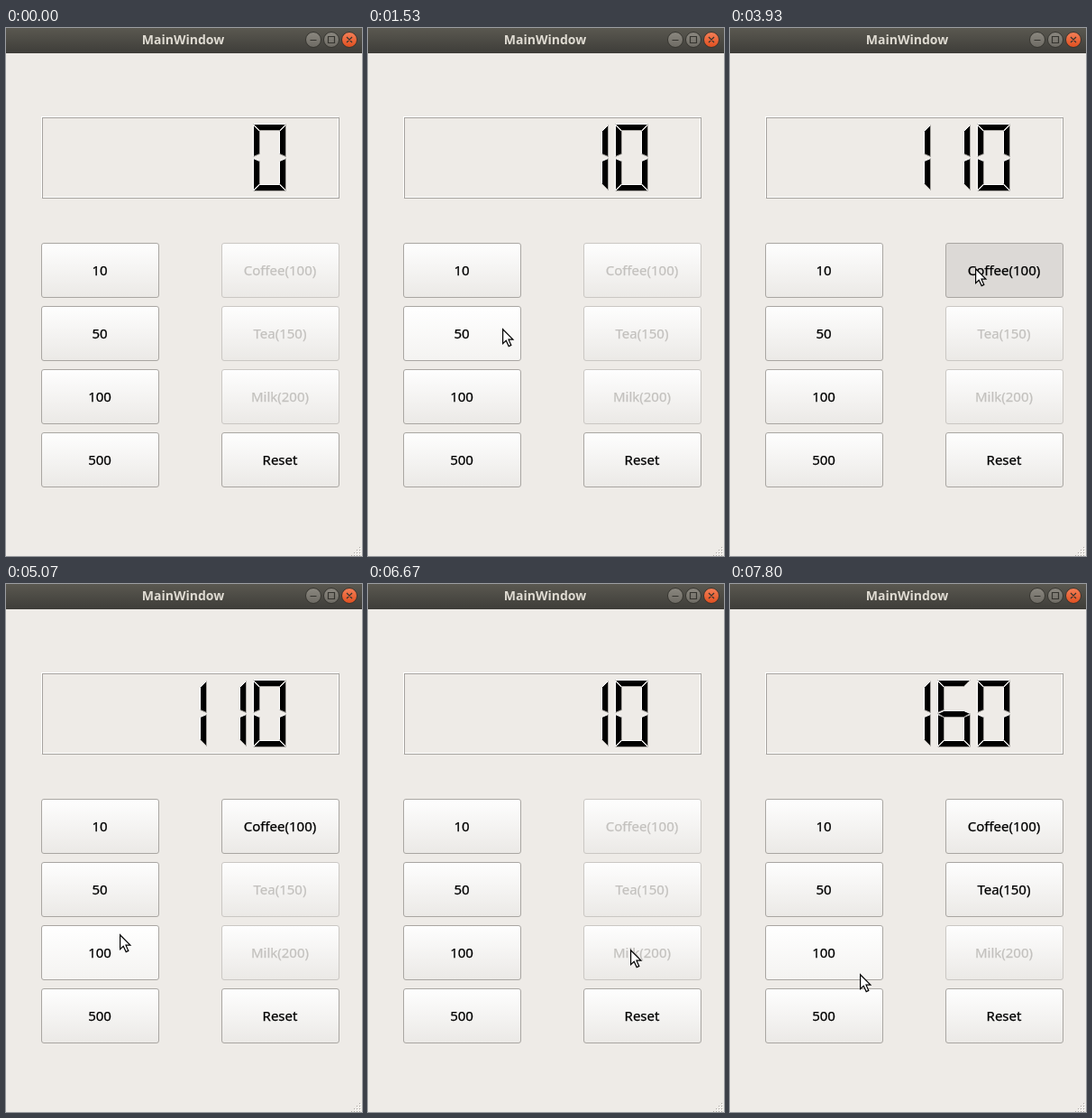
Recreate the animation shown at these times as an HTML page. Size 395 by 585 pixels, loop 8 s.

```html
<!DOCTYPE html>
<html lang="en">
<head>
<meta charset="utf-8">
<title>MainWindow</title>
<style>
  html, body { margin: 0; width: 100%; height: 100%; overflow: hidden; background: #eeebe7; }
  svg { display: block; width: 100%; height: 100%; }
  text { font: 15px "Noto Sans", "Open Sans", sans-serif; text-anchor: middle; }
  .title { font-size: 14px; font-weight: bold; fill: #dfdbd2; }
  .button rect { fill: url(#face); stroke: #a9a6a2; }
  .button text { fill: #000; stroke: #000; stroke-width: .25; }
  .button.hover rect { fill: url(#hoverFace); }
  .button.pressed rect { fill: #dcd9d6; }
  .button.disabled rect { stroke: #cac7c3; }
  .button.disabled text { fill: #c3c1be; stroke: #c3c1be; }
</style>
</head>
<body>
<svg viewBox="0 0 395 585">
  <defs>
    <linearGradient id="bar" x2="0" y2="1"><stop stop-color="#5a5850"/><stop offset="1" stop-color="#3e3d39"/></linearGradient>
    <linearGradient id="face" x2="0" y2="1"><stop stop-color="#fefefe"/><stop offset="1" stop-color="#ebe9e6"/></linearGradient>
    <linearGradient id="hoverFace" x2="0" y2="1"><stop stop-color="#fff"/><stop offset="1" stop-color="#f4f3f1"/></linearGradient>
    <linearGradient id="knob" x2="0" y2="1"><stop stop-color="#8b8880"/><stop offset="1" stop-color="#6d6a63"/></linearGradient>
    <linearGradient id="close" x2="0" y2="1"><stop stop-color="#f58058"/><stop offset="1" stop-color="#e04f1f"/></linearGradient>
  </defs>
  <rect width="395" height="585" fill="#eeebe7"/>
  <rect width="395" height="28" fill="url(#bar)"/>
  <text class="title" x="196.5" y="18">MainWindow</text>
  <g stroke="#35342f">
    <circle cx="341" cy="13" r="8.5" fill="url(#knob)"/>
    <circle cx="361" cy="13" r="8.5" fill="url(#knob)"/>
    <circle cx="381" cy="13" r="8.5" fill="url(#close)"/>
    <path d="M337.5 13.5h7M357.5 9.5h7v7h-7zM378 10l6 6m0-6l-6 6" fill="none" stroke-width="1.2"/>
  </g>
  <g fill="none">
    <rect x="39.5" y="98.5" width="329" height="89" stroke="#fff"/>
    <rect x="40.5" y="99.5" width="329" height="89" stroke="#a5a29e"/>
  </g>
  <g id="grip"></g>
  <g id="lcd"></g>
  <g id="buttons"></g>
  <path id="cursor" d="M.6 .8V16.6L4.2 13.2 7.2 19.6 9.8 18.4 7 12.2H11.9Z" fill="#fff" stroke="#000" stroke-width="1.2"/>
</svg>
<script>
const LOOP = 8000, FRAME = 1000 / 15;
const byId = id => document.getElementById(id);

function add(parent, tag, attrs, text) {
  const node = document.createElementNS('http://www.w3.org/2000/svg', tag);
  for (const key in attrs) node.setAttribute(key, attrs[key]);
  if (text) node.textContent = text;
  return parent.appendChild(node);
}

// Resize grip: a triangle of dots
for (let row = 0; row < 4; row++) {
  for (let col = 3 - row; col < 4; col++) {
    const x = 383 + col * 3, y = 575 + row * 3;
    add(byId('grip'), 'rect', { x: x + 1, y: y + 1, width: 1, height: 1, fill: '#fff' });
    add(byId('grip'), 'rect', { x, y, width: 1, height: 1, fill: '#aaa7a3' });
  }
}

// A label in brackets is the price; a coin's value is its label
const labels = ['10', '50', '100', '500', 'Coffee(100)', 'Tea(150)', 'Milk(200)', 'Reset'];
const buttons = labels.map((label, i) => {
  const x = i < 4 ? 39.5 : 239.5, y = 238.5 + (i % 4) * 70;
  const price = Number((label.match(/\((\d+)\)/) || [0, 0])[1]);
  const node = add(byId('buttons'), 'g', { class: 'button' });
  add(node, 'rect', { x, y, width: 130, height: 60, rx: 2.5 });
  add(node, 'text', { x: x + 64.5, y: y + 35 }, label);
  return { label, x, y, price, change: price ? -price : Number(label), node };
});

// Seven-segment digit: one bar and one side, mirrored, plus the middle
const LEN = 37, W = 7, HALF = 3, END = LEN - 1;
const flipX = points => points.map(([x, y]) => [END - x, y]).reverse();
const flipY = points => points.map(([x, y]) => [x, 2 * LEN - y]).reverse();
const bar = [[0, 0], [END, 0], [END - W, W], [W, W]];
const side = [[0, 1], [W, W + 1], [W, LEN - HALF - 1], [0, LEN - 1]];
const ridge = [[0, LEN], [W, LEN - HALF], [END - W, LEN - HALF], [END, LEN]];
const middle = [...ridge, [END - W, LEN + HALF + 1], [W, LEN + HALF + 1]];
const segments = {
  a: bar, b: flipX(side), c: flipX(flipY(side)), d: flipY(bar),
  e: flipY(side), f: side, g: middle
};
const lit = { 0: 'abcdef', 1: 'bc', 2: 'abdeg', 6: 'acdefg' };

function drawSegment(digit, points) {
  const segment = add(digit, 'g', {});
  add(segment, 'polygon', { points: points.join(' '), fill: '#000' });
  points.forEach((from, i) => {
    const to = points[(i + 1) % points.length];
    const dx = to[0] - from[0], dy = to[1] - from[1];
    // Edges facing up or straight left catch the light
    const light = dx > 0 || (dx === 0 && dy < 0);
    add(segment, 'path', { d: `M${from}L${to}`, stroke: light ? '#fff' : '#a9a6a2' });
  });
  return segment;
}

const digits = [0, 1, 2].map(place => {
  const digit = add(byId('lcd'), 'g', { transform: `translate(${186.5 + place * (LEN + W)} 106.5)` });
  return Object.entries(segments).map(([name, points]) => [name, drawSegment(digit, points)]);
});

// Where the pointer goes: leave and arrive times, the spot, and presses made there
const visits = [
  { leave: 70, arrive: 870, spot: [117, 270], target: '10', presses: [930] },
  { leave: 1070, arrive: 1530, spot: [149, 333], target: '50', presses: [2000, 2870] },
  { leave: 3270, arrive: 3600, spot: [272, 266], target: 'Coffee(100)', presses: [3870], hold: 130 },
  { leave: 4070, arrive: 4800, spot: [126, 388], target: '100', presses: [5000, 5530] },
  { leave: 5800, arrive: 6530, spot: [291, 405], target: 'Milk(200)', presses: [6400], hold: 270 },
  { leave: 6870, arrive: 7070, spot: [132, 336], target: '50', presses: [7200] },
  { leave: 7330, arrive: 7800, spot: [144, 432], target: '100', presses: [7600] }
];
const clicks = visits.flatMap(({ target, presses, hold = 70 }) => presses.map(down => (
  { down, up: down + hold, button: buttons.find(button => button.label === target) }
)));
const hidden = [[0, 70], [4130, 4600], [5330, 5470], [6870, 7070]];
const within = (time, from, to) => time >= from && time < to;

function cursorAt(time) {
  let position = [28, 376];
  for (const { leave, arrive, spot } of visits) {
    const p = Math.min(1, Math.max(0, (time - leave) / (arrive - leave)));
    const ease = 1 - (1 - p) ** 3;
    position = position.map((from, axis) => from + (spot[axis] - from) * ease);
  }
  return position.map(Math.round);
}

function render(time) {
  // The pointer advances at 15 steps a second, on a 10 ms grid
  const step = Math.round(Math.floor((time + 4) / FRAME) * FRAME / 10) * 10;
  const [x, y] = cursorAt(step);
  const balance = clicks.reduce((sum, { up, button }) => sum + (time >= up ? button.change : 0), 0);
  const active = clicks.find(({ down, up }) => within(time, down, up));

  byId('cursor').setAttribute('transform', `translate(${x} ${y})`);
  byId('cursor').style.display = hidden.some(span => within(time, ...span)) ? 'none' : '';

  for (const button of buttons) {
    const over = within(x, button.x, button.x + 130) && within(y, button.y, button.y + 60);
    const state = balance < button.price ? 'disabled'
      : active && active.button === button ? 'pressed' : over ? 'hover' : '';
    button.node.setAttribute('class', 'button ' + state);
  }

  const shown = String(balance).padStart(digits.length);
  digits.forEach((digit, i) => digit.forEach(([name, segment]) => {
    segment.style.display = (lit[shown[i]] || '').includes(name) ? '' : 'none';
  }));
}

const start = performance.now();
function tick() {
  render((performance.now() - start) % LOOP);
  requestAnimationFrame(tick);
}
tick();
</script>
</body>
</html>
```
